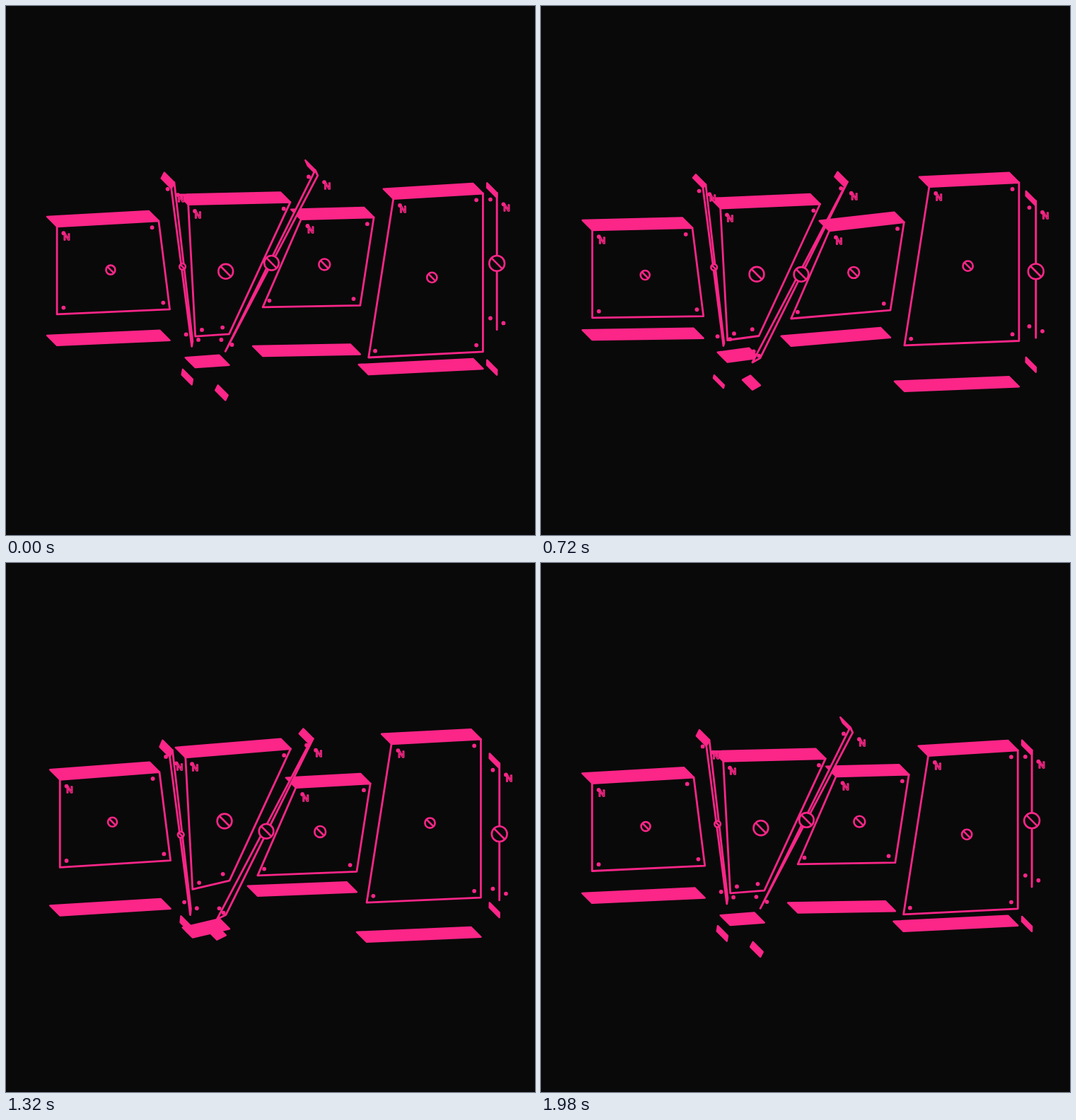
An HTML page that plays this animation: 748x748 px, repeating every 2 s.

```html
<!DOCTYPE html>
<html lang="en">
<head>
<meta charset="utf-8">
<title>Floating panels</title>
<style>
  html, body { margin: 0; width: 100%; height: 100%; overflow: hidden; background: #090909; }
  svg { display: block; width: 100vw; height: 100vh; }
  .panel { stroke: #fb2688; stroke-width: 2.8; stroke-linejoin: round; }
  .face, .sign { fill: #090909; }
  .sign { stroke-width: 2.6; }
  .band { fill: #fb2688; stroke-width: 2.4; }
  .dot { fill: #fb2688; stroke: none; }
  text { font: bold 13px "Liberation Sans", Arial, sans-serif; text-anchor: middle; fill: #090909; stroke-width: 1.4; }
</style>
</head>
<body>
<svg id="stage" viewBox="0 0 748 748"></svg>
<script>
const LOOP = 2000;
const DEPTH = 14;
const FLOOR_GAP = 47;
const FLOOR_SWING = 23.3;
const INSET = 9.3;

// A wave is [mean, cosine part, sine part].
// left/right: x and y waves of the two top corners.
// leftEdge/rightEdge: vectors from each top corner down to its bottom corner.
// floor: phase in degrees of the lower band; r: radius of the round sign.
const panels = [
  { left: [[73.5, -1.4, -2.4], [311.9, 0, 6.6]], right: [[215.6, 0.3, -1.8], [304.6, -0.8, 11]],
    leftEdge: [0, 124], rightEdge: [15.7, 125], floor: 262.6, r: 6.5 },
  { left: [[255.2, 2.5, 0.1], [280.7, 0, 6.9]], right: [[399.7, 2.3, -4.75], [273.8, 3.5, 11]],
    leftEdge: [10, 186.5], rightEdge: [-86.5, 186.5], floor: 262.6, r: 10.4 },
  { left: [[411.8, 5.3, -1], [311.8, -10.1, -0.6]], right: [[516.4, 3.7, -0.9], [305, -6.1, -4.3]],
    leftEdge: [-54, 124.2], rightEdge: [-19.3, 124.5], floor: 19, r: 7.9 },
  { left: [[547.3, 0.4, 2.4], [262, 10.7, 0.6]], right: [[674, 0.4, 2.8], [255.2, 9.8, 0.9]],
    leftEdge: [-35, 224.3], rightEdge: [0, 223.9], floor: 170, r: 7.1 },
  { left: [[231.5, 2.2, -1.45], [262.4, -4.6, -10.9]], right: [[235.5, 2.4, -1.4], [255, -5.4, -8]],
    leftEdge: [29, 223.5], rightEdge: [26, 224.2], floor: 72.4, r: 4.3 },
  { left: [[433.4, 7.3, 0.9], [249.6, -9.8, -0.6]], right: [[435.1, 2.1, -0.4], [242.4, -10.3, -0.6]],
    leftEdge: [-130.5, 248.5], rightEdge: [-123.5, 249.2], floor: 19, r: 10.3 },
  { left: [[697, -2.9, 1.1], [280.5, -9.5, -5.4]], right: [[697.1, -2.9, 1.1], [273.8, -9.5, -5.4]],
    leftEdge: [0, 186.7], rightEdge: [0, 186.5], floor: 43.8, r: 10.9 }
];

const stage = document.getElementById("stage");

function add(parent, tag, attrs = {}) {
  const node = document.createElementNS("http://www.w3.org/2000/svg", tag);
  for (const key in attrs) node.setAttribute(key, attrs[key]);
  return parent.appendChild(node);
}

const shift = ([x, y], [dx, dy]) => [x + dx, y + dy];
const place = (node, [x, y]) => node.setAttribute("transform", `translate(${x.toFixed(2)} ${y.toFixed(2)})`);
const outline = (node, points) =>
  node.setAttribute("points", points.map(p => p.map(v => v.toFixed(2)).join()).join(" "));

function setBand(node, a, b) {
  const back = [-DEPTH, -DEPTH];
  outline(node, [a, b, shift(b, back), shift(a, back)]);
}

for (const panel of panels) {
  const group = add(stage, "g", { class: "panel" });
  panel.floorBand = add(group, "polygon", { class: "band" });
  panel.topBand = add(group, "polygon", { class: "band" });
  panel.face = add(group, "polygon", { class: "face" });
  panel.label = add(group, "text", { x: 13.8, y: 18.9 });
  panel.label.textContent = "N";
  panel.dots = [[1, 1], [-1, 1], [-1, -1], [1, -1]].map(([sx, sy]) =>
    add(group, "circle", { class: "dot", r: 2.9, cx: sx * INSET, cy: sy * INSET }));
  panel.sign = add(group, "g", { class: "sign" });
  const k = panel.r * 0.7;
  add(panel.sign, "circle", { r: panel.r });
  add(panel.sign, "line", { x1: -k, y1: -k, x2: k, y2: k });
}

function draw(time) {
  const angle = time / LOOP * 2 * Math.PI;
  const c = Math.cos(angle), s = Math.sin(angle);
  const wave = ([mean, a, b]) => mean + a * c + b * s;

  for (const panel of panels) {
    const topLeft = panel.left.map(wave);
    const topRight = panel.right.map(wave);
    const bottomLeft = shift(topLeft, panel.leftEdge);
    const bottomRight = shift(topRight, panel.rightEdge);
    const corners = [topLeft, topRight, bottomRight, bottomLeft];
    const drop = [0, FLOOR_GAP + FLOOR_SWING * Math.cos(angle - panel.floor * Math.PI / 180)];
    const centre = [0, 1].map(i => corners.reduce((sum, p) => sum + p[i], 0) / 4);

    outline(panel.face, corners);
    setBand(panel.topBand, topLeft, topRight);
    setBand(panel.floorBand, shift(bottomLeft, drop), shift(bottomRight, drop));
    corners.forEach((p, i) => place(panel.dots[i], p));
    place(panel.label, topLeft);
    place(panel.sign, shift(centre, [0, 3]));
  }
}

const start = performance.now();
function tick() {
  draw((performance.now() - start) % LOOP);
  requestAnimationFrame(tick);
}
tick();
</script>
</body>
</html>
```
